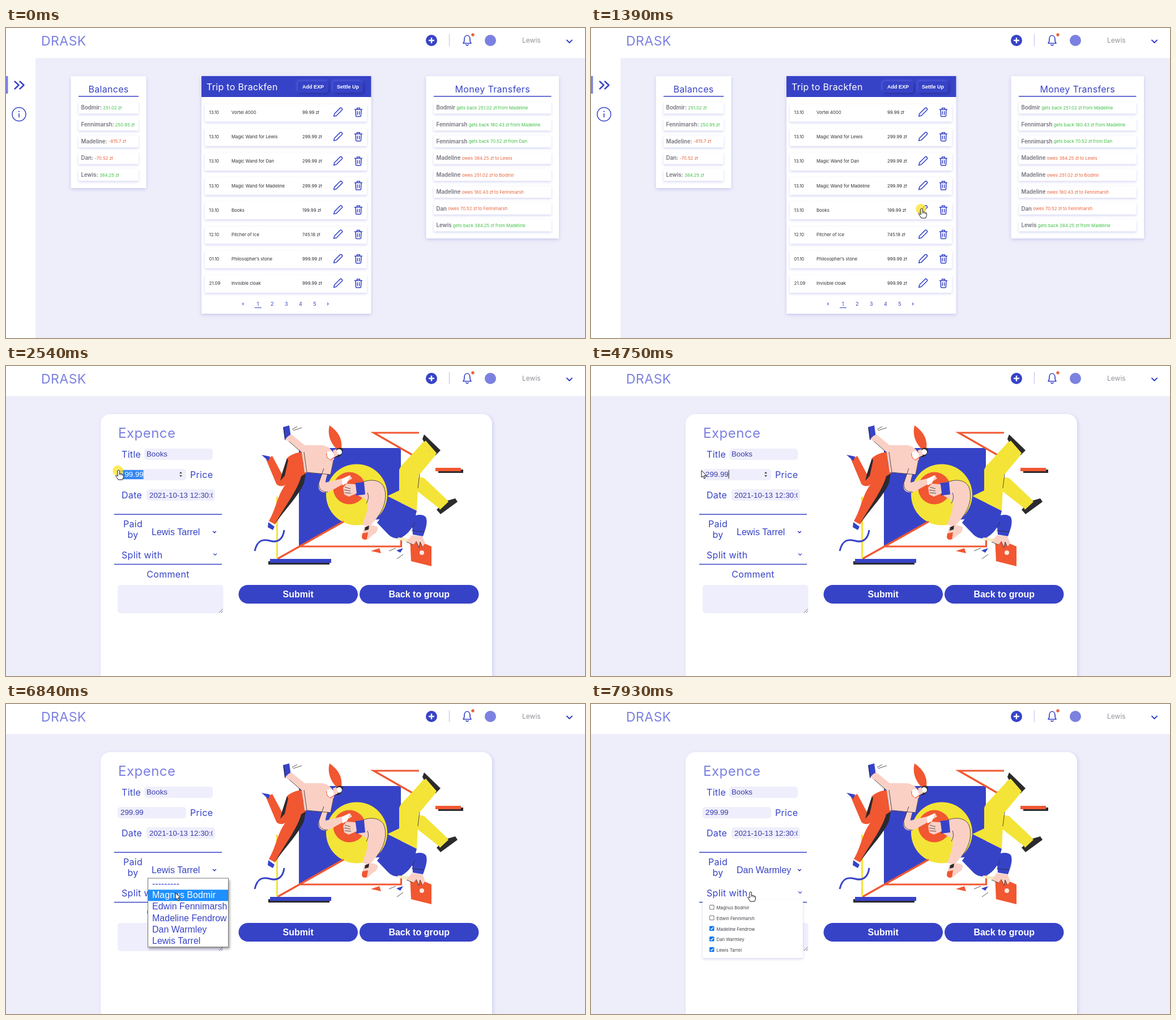
An HTML page with a canvas for the animation above (7.99 s loop, 1022 by 548 pixels).

```html
<!DOCTYPE html>
<html lang="en">
<head>
<meta charset="utf-8">
<title>Expense sharing</title>
<style>
html, body { margin: 0; width: 100%; height: 100%; overflow: hidden; background: #fff; }
canvas { display: block; }
</style>
</head>
<body>
<canvas id="stage" width="1022" height="548"></canvas>
<script>
const ctx = document.getElementById('stage').getContext('2d');
const LOOP = 7990;
const BLUE = '#3743c7', LILAC = '#7b81e0', BACK = '#eeeefb', FIELD = '#efeefc';
const GREEN = '#3fbf45', ORANGE = '#e8633c', GRAY = '#74747f';
const RED = '#f15731', YELLOW = '#f4e437', PINK = '#fad0c5', DARK = '#2b2a2e';
const SANS = 'Inter, sans-serif', ARIAL = '"Liberation Sans", Arial, sans-serif';
const PEOPLE = ['Magnus Bodmir', 'Edwin Fennimarsh', 'Madeline Fendrow', 'Dan Warmley', 'Lewis Tarrel'];
const [BODMIR, FENNIMARSH] = PEOPLE.slice(0, 2).map(n => n.split(' ')[1]);
const [MADELINE, DAN, LEWIS] = PEOPLE.slice(2).map(n => n.split(' ')[0]);

const ease = k => k * k * (3 - 2 * k);
const clamp = k => Math.max(0, Math.min(1, k));

function text(s, x, y, size, color, { weight = 400, font = SANS, align = 'left' } = {}) {
  ctx.font = `${weight} ${size}px ${font}`;
  ctx.letterSpacing = font === SANS && size >= 15 ? size * 0.02 + 'px' : '0px';
  ctx.textAlign = align;
  ctx.fillStyle = color;
  ctx.fillText(s, x, y);
  return ctx.measureText(s).width;
}

function box(x, y, w, h, color, r = 0, shadow) {
  ctx.save();
  if (shadow) {
    [ctx.shadowColor, ctx.shadowBlur, ctx.shadowOffsetX, ctx.shadowOffsetY] = shadow;
  }
  ctx.fillStyle = color;
  ctx.beginPath();
  ctx.roundRect(x, y, w, h, r);
  ctx.fill();
  ctx.restore();
}

function disc(x, y, r, color) {
  ctx.fillStyle = color;
  ctx.beginPath();
  ctx.arc(x, y, r, 0, Math.PI * 2);
  ctx.fill();
}

function fill(color, d) {
  ctx.fillStyle = color;
  ctx.fill(new Path2D(d));
}

function line(color, width, d, cap = 'butt') {
  ctx.strokeStyle = color;
  ctx.lineWidth = width;
  ctx.lineCap = cap;
  ctx.lineJoin = cap === 'round' ? 'round' : 'miter';
  ctx.stroke(new Path2D(d));
}

function at(x, y, draw) {
  ctx.save();
  ctx.translate(x, y);
  draw();
  ctx.restore();
}

const CARD = ['rgba(60,65,170,.22)', 6, 0, 2];
const ROW = ['rgba(80,85,200,.24)', 4, 0, 2];

function header() {
  box(0, 0, 1022, 53, '#fff');
  text('DRASK', 62, 31, 23, LILAC);
  disc(751, 22, 10, BLUE);
  line('#fff', 2.4, 'M746 22H756M751 17V27');
  line('#c9c8ee', 1.3, 'M782.5 11V32');
  line(BLUE, 1.7, 'M807 27H821C819 25 819 23 819 20C819 11 809 11 809 20C809 23 809 25 807 27ZM812 29.5Q814 32 816 29.5', 'round');
  disc(824, 12, 2.7, ORANGE);
  disc(855, 22, 10, LILAC);
  text(LEWIS, 911, 25.5, 12, '#929299');
  line(BLUE, 2, 'M990 21.5L994.5 26L999 21.5', 'round');
}

function sidebar() {
  box(0, 53, 52, 495, '#fff');
  box(0, 85, 3.5, 31, LILAC);
  line(BLUE, 2.4, 'M15.5 94.5L22.5 101L15.5 107.5M24.5 94.5L31.5 101L24.5 107.5', 'round');
  ctx.beginPath();
  ctx.arc(23, 152.5, 12, 0, 7);
  ctx.strokeStyle = BLUE;
  ctx.lineWidth = 1.5;
  ctx.stroke();
  line(BLUE, 1.6, 'M23 151V158');
  disc(23, 147.7, 1.1, BLUE);
}

function summary(x, w, h, title, rows) {
  box(x, 85, w, h, '#fff', 1, CARD);
  text(title, x + w / 2, 114, 16, BLUE, { align: 'center' });
  const left = x + 13.5, inner = w - 27;
  box(left, 120, inner, 1.6, BLUE);
  rows.forEach(([name, detail, color], i) => {
    const y = 141 + i * 29.7;
    box(left, y - 10, inner, 20.5, '#fff', 1, ROW);
    const used = text(name, left + 4.5, y + 3.3, 9.7, GRAY, { weight: 600 });
    text(detail, left + 6.8 + used, y + 3, 7.8, color);
  });
}

function pencil(x, y) {
  at(x, y, () => {
    ctx.rotate(Math.PI / 4);
    line(BLUE, 1.5, 'M-2.4 -8Q-2.4 -10 0 -10Q2.4 -10 2.4 -8V6L0 10L-2.4 6Z', 'round');
  });
}

function trash(x, y) {
  at(x, y, () => line(BLUE, 1.5,
    'M-6.5 -5H6.5M-2.5 -5V-7.5H2.5V-5M-5 -5L-4.5 6Q-4.4 7.5 -3 7.5H3Q4.4 7.5 4.5 6L5 -5M-1.7 -1.5V4M1.7 -1.5V4', 'round'));
}

function headerButton(label, x, w) {
  box(x, 94, w, 20, BLUE, 4, ['rgba(20,25,110,.55)', 5, 2, 2]);
  box(x, 94, w, 20, BLUE, 4, ['rgba(120,130,255,.5)', 4, -1.5, -1.5]);
  text(label, x + w / 2, 107.2, 9, '#fff', { weight: 700, font: ARIAL, align: 'center' });
}

const EXPENSES = [
  ['13.10', 'Vortel 4000', '99.99'],
  ['13.10', `Magic Wand for ${LEWIS}`, '299.99'],
  ['13.10', `Magic Wand for ${DAN}`, '299.99'],
  ['13.10', `Magic Wand for ${MADELINE}`, '299.99'],
  ['13.10', 'Books', '199.99'],
  ['12.10', 'Pitcher of Ice', '745.18'],
  ['01.10', 'Philosopher\u2019s stone', '999.99'],
  ['21.09', 'Invisible cloak', '999.99'],
];

function expenses() {
  box(345, 85, 299.5, 420, '#fff', 1, CARD);
  box(345, 85, 299.5, 37, BLUE);
  text('Trip to Brackfen', 354, 109.5, 16, '#fff');
  headerButton('Add EXP', 515, 54);
  headerButton('Settle Up', 577, 53);
  EXPENSES.forEach(([date, name, price], i) => {
    const y = 149 + i * 43.2;
    box(351, y - 14.5, 286, 31, '#fff', 1, ROW);
    text(date, 358.5, y + 3, 7.8, '#303038');
    text(name, 398, y + 3, 7.8, '#303038');
    text(price + ' zł', 523, y + 3, 7.8, '#303038');
    pencil(585.7, y);
    trash(622, y);
  });
  [1, 2, 3, 4, 5].forEach(n => text(n, 419.5 + n * 25.1, 491, 9, BLUE, { align: 'center' }));
  box(439, 494, 12, 1, BLUE);
  line(BLUE, 1.1, 'M419.5 485.5L417.5 487.8L419.5 490M567 485.5L569 487.8L567 490');
}

function groupPage() {
  sidebar();
  summary(114.5, 133, 198, 'Balances', [
    [BODMIR + ':', '251.02 zł', GREEN],
    [FENNIMARSH + ':', '250.95 zł', GREEN],
    [MADELINE + ':', '-815.7 zł', ORANGE],
    [DAN + ':', '-70.52 zł', ORANGE],
    [LEWIS + ':', '384.25 zł', GREEN],
  ]);
  expenses();
  const gets = (who, sum, from) => [who, `gets back ${sum} zł from ${from}`, GREEN];
  const owes = (who, sum, to) => [who, `owes ${sum} zł to ${to}`, ORANGE];
  summary(741.5, 234.5, 287, 'Money Transfers', [
    gets(BODMIR, '251.02', MADELINE),
    gets(FENNIMARSH, '180.43', MADELINE),
    gets(FENNIMARSH, '70.52', DAN),
    owes(MADELINE, '384.25', LEWIS),
    owes(MADELINE, '251.02', BODMIR),
    owes(MADELINE, '180.43', FENNIMARSH),
    owes(DAN, '70.52', FENNIMARSH),
    gets(LEWIS, '384.25', MADELINE),
  ]);
}

function scenery() {
  fill(BLUE, 'M517 145H697V268L595 276L517 319Z');
  disc(619, 227.5, 54, YELLOW);
  disc(606, 216, 28.5, RED);
  line(RED, 3.2, 'M729 118H649L717 157M479 341L596 275M517 319H697.5V284');
  line(YELLOW, 3, 'M478.5 231V340');
  box(463, 345, 108, 6, DARK);
  box(466, 341, 108, 7, BLUE);
  box(763, 183, 44, 6, DARK);
  box(758, 180, 45, 6, RED);
  line(BLUE, 3, 'M439 327C444 306 455 306 466 309C480 313 489 306 491 290');
  fill(RED, 'M644 327L659 322L662 331Z');
  fill(BLUE, 'M689 326L701 322L696 330Z');
  line(DARK, 0.8, 'M676 327L688 322M690 341L701 333M505 112L514 107M507 114L522 109');
}

function leftFigure() {
  fill(RED, 'M524 152C511 153 502 157 496 163L487 191L470 159L459 165L477 208C482 215 492 213 497 206L524 184Z');
  fill(DARK, 'M487 191L496 163L498 167L492 194L484 203Z');
  fill(RED, 'M522 164L529 190C522 217 496 245 475 280L464 274C478 250 479 226 496 206Z');
  fill(DARK, 'M529 190L526 207C517 228 496 250 480 272L475 279C492 248 514 221 521 195Z');
  fill(BLUE, 'M451 157L466 160L463 168ZM463 276L474 284L471 290L462 285Z');
  fill(PINK, 'M504 121L527 140L558 140C571 142 580 151 579 164L573 192L527 188L522 153L497 131Z');
  fill(PINK, 'M578 163C571 181 564 198 564 206L593 199L607 193L611 199L598 207L573 221C558 228 549 220 552 207L561 181Z');
  line(DARK, 0.8, 'M526 152L531 188L573 192L578 166M561 181L552 207Q551 223 568 223M497 131L522 153');
  fill(BLUE, 'M489 108L500 105L503 126L492 131Z');
  fill(PINK, 'M498 124L503 121L508 128L499 134L493 129Z');
  line(DARK, 1, 'M490 109L493 129');
  fill(RED, 'M571 105C588 117 594 130 592 147L584 147C572 136 567 120 571 105Z');
  fill(DARK, 'M584 146Q592 142 595 148L592 157Q587 163 580 160Z');
  disc(572, 158, 7.5, '#fff');
  line(RED, 1.2, 'M566 154Q564 163 573 166L581 160');
  disc(588, 152, 5, '#fff');
  fill(PINK, 'M577 149L583 147L586 158L579 161Z');
  fill('#fff', 'M593 200L607 193L602 207L594 211Z');
}

function rightFigure() {
  fill(YELLOW, 'M736 135L758 158L728 194L725 256L673 230L694 220V184Q696 177 702 172Z');
  fill(YELLOW, 'M722 195L738 198L779 237L764 251L722 218Z');
  line(DARK, 0.8, 'M730 191L727 216');
  fill(DARK, 'M738 121L767 149L758 158L746 150L735 129ZM760 254L776 239L793 234L797 240L767 262Z');
  fill(YELLOW, 'M733 137L741 132L760 154L756 160ZM763 249L777 236L781 240L766 254Z');
  fill(PINK, 'M630 205C646 199 661 202 667 214C674 232 667 253 655 268L642 284L629 281C636 261 642 247 636 237L620 228Z');
  fill(BLUE, 'M616 207L632 205L634 227L618 229Z');
  fill(PINK, 'M617 209L601 208L595 215L597 227L605 231L619 225Z');
  line(DARK, 0.8, 'M598 214L608 217M597 219L608 221M598 224L609 225');
  fill(BLUE, 'M673 230L725 256L723 264Q735 261 741 267C745 275 741 288 736 301L718 298L717 285C703 306 688 310 675 298L655 277C667 262 674 247 673 230Z');
  line(DARK, 0.8, 'M630 205C646 199 661 202 667 214C674 232 667 253 655 268M638 224Q642 233 636 243M717 286L722 276M716 291L738 293');
  fill(PINK, 'M632 285Q645 278 656 285Q657 294 648 298L638 307Q628 307 629 298Z');
  fill(RED, 'M629 296L639 294L637 306Q629 309 628 302Z');
  fill(DARK, 'M634 285L641 282L640 289L633 291Z');
  fill(RED, 'M713 303L751 319V354L715 345Z');
  disc(734, 330, 4, '#ffe9df');
  fill('#f6ecc0', 'M692 303L719 306L714 312L692 307Z');
  fill(PINK, 'M716 299L735 301L740 313L735 320L731 311L729 321L724 310L719 316L707 311Z');
  line(DARK, 0.8, 'M724 310L729 321L731 311L735 320M719 316L707 311');
}

const field = (x, y) => box(x, y, 121, 20, FIELD, 5);
const arial = (s, x, y, size = 13.3, color = '#3a3fa8') => text(s, x, y, size, color, { font: ARIAL });

function priceField(t) {
  field(197, 182);
  const keys = [3420, 3680, 3880, 4350, 4680, 4750];
  const typed = keys.filter(k => t >= k).length;
  const value = typed ? '299.99'.slice(0, typed) : '199.99';
  const width = arial(value, 202, 196);
  if (t >= 2200 && !typed) {
    const from = t < 2540 ? Math.max(202, Math.min(242, cursorAt(t).x)) : 202;
    ctx.save();
    ctx.beginPath();
    ctx.rect(from, 184, 242.5 - from, 16);
    ctx.clip();
    box(202, 184, 41, 16, '#2f86f2');
    arial(value, 202, 196, 13.3, '#fff');
    ctx.restore();
  }
  if (typed && t < 5900) box(202 + width, 184, 1, 15, '#222');
  if (t >= 1930 && t < 5900) fill('#444', 'M306 190L308.5 187L311 190ZM306 193L308.5 196L311 193Z');
}

function payerList(t, cursor) {
  box(250, 307.5, 143, 122.5, '#777', 0, ['rgba(0,0,0,.35)', 4, 2, 3]);
  box(251, 308.5, 141, 120.5, '#fff');
  const hovered = t < 6370 || cursor.y < 309 ? 5 : Math.floor((cursor.y - 308) / 20.1);
  ['---------', ...PEOPLE].forEach((name, i) => {
    const y = 308.2 + i * 20.1;
    if (i === hovered) box(251, y, 141, 20, '#1e90ff');
    arial(name, 258, y + 15, 16, i === hovered ? '#fff' : BLUE);
  });
}

function splitList(t) {
  const h = 103 * ease(clamp((t - 7560) / 270));
  box(197, 346, 177, h, '#fff', 2, ROW);
  ctx.save();
  ctx.beginPath();
  ctx.rect(197, 346, 177, h);
  ctx.clip();
  PEOPLE.forEach((name, i) => {
    const y = 359.5 + i * 18.7;
    const checked = i > 1;
    box(209, y - 4.5, 8.5, 8.5, checked ? '#0a75f0' : '#777', 1.5);
    if (checked) line('#fff', 1.3, `M211 ${y}l1.8 1.8l3 -4`);
    else box(210, y - 3.5, 6.5, 6.5, '#fff', 1);
    text(name, 221.5, y + 3.6, 7.8, '#44444c');
  });
  ctx.restore();
}

function pill(label, x) {
  box(x, 387, 210.5, 33, BLUE, 16.5);
  text(label, x + 105.2, 409.3, 16, '#fff', { weight: 700, font: ARIAL, align: 'center' });
}

function formPage(t, cursor) {
  const label = (s, x, y, align) => text(s, x, y, 16, BLUE, { align });
  box(167, 85, 691, 500, '#fff', 17, ['rgba(80,85,200,.2)', 6, 2, 2]);
  text('Expence', 198, 126.5, 24, LILAC);
  label('Title', 204, 161.5);
  field(244, 146);
  arial('Books', 248, 160);
  priceField(t);
  label('Price', 325, 197.5);
  label('Date', 204, 234);
  field(248, 218);
  ctx.save();
  ctx.beginPath();
  ctx.rect(248, 218, 116.5, 20);
  ctx.clip();
  arial('2021-10-13 12:30:00', 253, 232.5);
  ctx.restore();
  box(191, 261.5, 190, 1.6, BLUE);
  label('Paid', 224, 285, 'center');
  label('by', 224, 304, 'center');
  arial(PEOPLE[t < 7260 ? 4 : 3], 257, 299, 16, BLUE);
  line(BLUE, 1.7, 'M365.2 292L368 294.8L370.8 292');
  label('Split with', 204, 340);
  line(BLUE, 1.2, 'M366.2 331.5L369 334.3L371.8 331.5');
  box(191, 349.7, 190, 1.6, BLUE);
  label('Comment', 286, 373.5, 'center');
  box(197, 387, 186.5, 50, FIELD, 5);
  line('#666', 0.9, 'M376 436L382.5 429.5M380 436L382.5 433.5');
  pill('Submit', 410.5);
  pill('Back to group', 624);
  scenery();
  leftFigure();
  rightFigure();
  if (t >= 5960 && t < 7260) payerList(t, cursor);
  if (t >= 7600) splitList(t);
}

// Pointer stops: time, x, y
const STOPS = [
  [190, 926, 532], [860, 583, 320], [1390, 583, 320], [1600, 586, 322], [1720, 586, 322],
  [2000, 249, 188], [2200, 246, 186], [2540, 198, 185], [2820, 195, 185], [5290, 195, 185],
  [5840, 286, 294], [6370, 286, 294], [6840, 299, 334], [7120, 252, 396], [7260, 252, 396],
  [7460, 281, 333], [LOOP, 281, 333],
];
const inside = (t, spans) => spans.some(([from, to]) => t >= from && t < to);
const HANDS = [[800, 1460], [1930, 2820], [5770, 6100], [7330, LOOP]];
const CLICKS = [[1390, 1460], [2200, 2760], [5890, 5960], [7190, 7260]];

function cursorAt(t) {
  const i = STOPS.findIndex(s => s[0] > t);
  if (i < 1) return { x: STOPS[0][1], y: STOPS[0][2] };
  const [a, b] = [STOPS[i - 1], STOPS[i]];
  const k = ease((t - a[0]) / (b[0] - a[0]));
  return { x: a[1] + (b[1] - a[1]) * k, y: a[2] + (b[2] - a[2]) * k };
}

function drawCursor(t, { x, y }) {
  if (t < STOPS[0][0]) return;
  if (inside(t, CLICKS)) disc(x - 0.5, y, 9.3, 'rgba(255,226,40,.75)');
  const hand = inside(t, HANDS);
  const shape = hand
    ? 'M-1 0Q1 -2 2.3 0V5.5Q4 4.3 5 6Q6.7 5 7.5 6.8Q9.4 6 9.5 8.3V11.5L7.7 16H0L-4.3 9.3Q-4.4 6.9 -1 9.5Z'
    : 'M0 0V12L2.8 9.4L4.8 14L6.8 13.1L4.8 8.7H8.6Z';
  at(x, y, () => {
    fill('#fff', shape);
    line('#17171c', 1, shape, 'round');
    if (hand) line('#17171c', 0.8, 'M2.3 5.5V8M5 6V8.5M7.5 7V9');
  });
}

function frame() {
  const t = performance.now() % LOOP;
  const cursor = cursorAt(t);
  box(0, 0, 1022, 548, BACK);
  header();
  if (t < 1460) groupPage();
  else formPage(t, cursor);
  drawCursor(t, cursor);
  requestAnimationFrame(frame);
}
requestAnimationFrame(frame);
</script>
</body>
</html>
```
